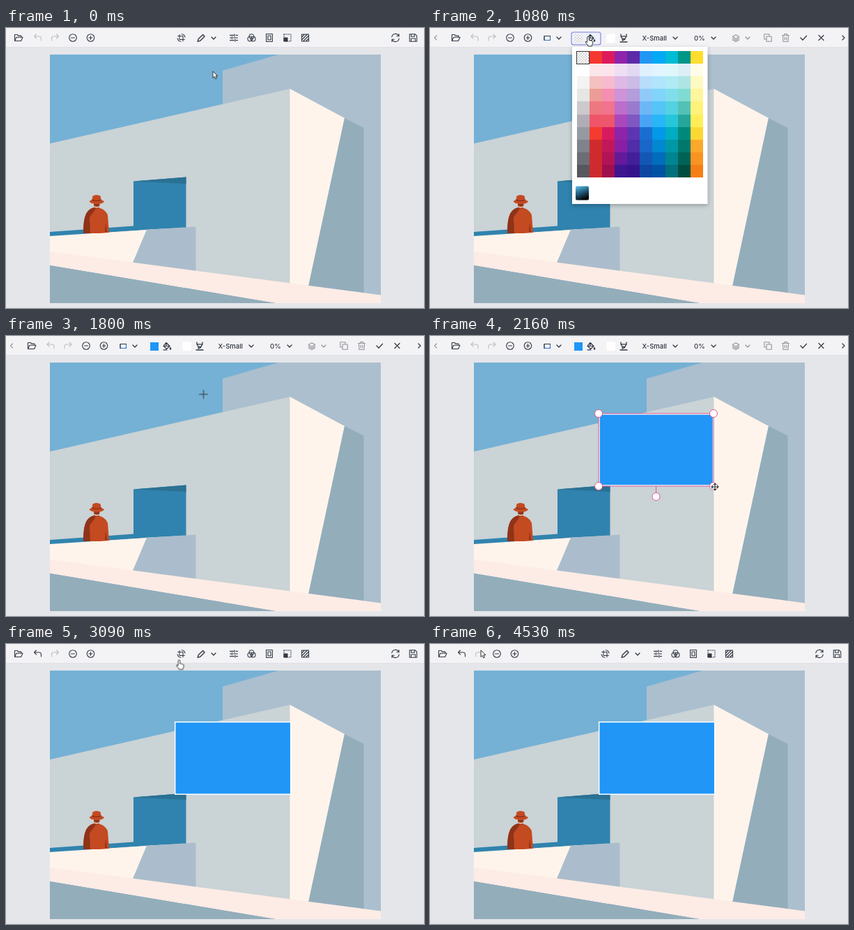
Recreate the animation shown at these times as an HTML page. Size 600 by 401 pixels, loop 4560 ms.

```html
<!DOCTYPE html>
<html lang="en">
<head>
<meta charset="utf-8">
<title>Image editor: draw, undo, redo</title>
<style>
html, body { margin: 0; width: 100%; height: 100%; overflow: hidden; background: #e5e6ea }
svg { display: block }
text { font: 500 9.5px Inter, sans-serif; fill: #2c323c; stroke: none }
.icons { fill: none; stroke: #333944; stroke-width: 1.1; stroke-linejoin: round; stroke-linecap: round }
.off { opacity: .28 }
.dim { opacity: .5 }
.panel { fill: #fff; filter: drop-shadow(0 2px 3px #0004) }
.grip { fill: #fff; stroke: #e2578f; stroke-width: 1 }

.step { animation: 4.56s step-end infinite }
#main { animation-name: main }
#draw { animation-name: draw }
#menu { animation-name: menu }
#hover { animation-name: hover }
#palette, #active { animation-name: palette }
#clear { animation-name: clear }
#blue { animation-name: blue }
#mark { animation-name: mark }
#undoMain { animation-name: undoMain }
#redoMain { animation-name: redoMain }
#undoDraw { animation-name: undoDraw }
.tools { animation-name: tools }
#placed { animation-name: placed }
#selection { animation-name: selection }
#arrow { animation-name: arrow }
#hand { animation-name: hand }
#cross { animation-name: cross }
#move { animation-name: move }
#drag { animation: dragShow 4.56s step-end infinite, dragSize 4.56s linear infinite }
#cursor { animation: travel 4.56s ease-in-out infinite }

@keyframes main { 0%, 60.4% { opacity: 1 } 15.1% { opacity: 0 } }
@keyframes draw { 0%, 60.4% { opacity: 0 } 15.1% { opacity: 1 } }
@keyframes menu { 0%, 15.1% { opacity: 0 } 7.2% { opacity: 1 } }
@keyframes hover { 0% { opacity: 0; transform: translateY(0) } 9.4% { opacity: 1; transform: translateY(0) } 10% { opacity: 1; transform: translateY(20.2px) } 11.1% { opacity: 1; transform: translateY(40.4px) } }
@keyframes palette { 0%, 36.4% { opacity: 0 } 22.6% { opacity: 1 } }
@keyframes clear { 0% { opacity: 1 } 32.8% { opacity: 0 } }
@keyframes blue { 0% { opacity: 0 } 32.8% { opacity: 1 } }
@keyframes mark { 0% { transform: none } 32.8% { transform: translateX(90.7px) } }
@keyframes undoMain { 0%, 75.6% { opacity: .28 } 60.4%, 86.7% { opacity: 1 } }
@keyframes redoMain { 0%, 86.7% { opacity: .28 } 75.6% { opacity: 1 } }
@keyframes undoDraw { 0% { opacity: .28 } 48.6% { opacity: 1 } }
@keyframes tools { 0% { opacity: .5 } 48.6% { opacity: 1 } }
@keyframes placed { 0%, 75.6% { opacity: 0 } 60.4%, 86.7% { opacity: 1 } }
@keyframes selection { 0%, 60.4% { opacity: 0 } 46.6% { opacity: 1 } }
@keyframes dragShow { 0%, 46.6% { opacity: 0 } 41.6% { opacity: 1 } }
@keyframes dragSize { 0%, 41.4% { width: 0; height: 0 } 46%, 100% { width: 164px; height: 102px } }
@keyframes arrow { 0%, 49.6%, 75.6%, 86.7% { opacity: 1 } 4.6%, 57%, 80.5% { opacity: 0 } }
@keyframes hand { 0%, 15.1%, 36.4%, 75.6%, 86.7% { opacity: 0 } 4.6%, 20.2%, 57%, 80.5% { opacity: 1 } }
@keyframes cross { 0%, 20.2%, 46.6% { opacity: 0 } 15.1%, 36.4% { opacity: 1 } }
@keyframes move { 0%, 49.6% { opacity: 0 } 46.6% { opacity: 1 } }
@keyframes travel {
  0%, .6% { transform: translate(297px, 62px) }
  5.9%, 7.7% { transform: translate(298px, 13px) }
  11.8%, 15.1% { transform: translate(299px, 71px) }
  21.7%, 24.3% { transform: translate(227px, 13px) }
  31.6%, 36% { transform: translate(311px, 42px) }
  39.2%, 39.6% { transform: translate(283.5px, 83.5px) }
  41%, 41.4% { transform: translate(243px, 112px); animation-timing-function: linear }
  46%, 48.2% { transform: translate(409px, 216px) }
  57.9%, 61.2% { transform: translate(536px, 13px) }
  67.6%, 68% { transform: translate(248.5px, 23.5px) }
  73%, 77.6% { transform: translate(44px, 13px) }
  82.2%, 97% { transform: translate(70px, 12px) }
  99.2%, 100% { transform: translate(73px, 9px) }
}
</style>
</head>
<body>
<svg width="600" height="401" viewBox="0 0 600 401">
<defs>
  <path id="open" d="M-5.5 4.5V-4.5h3.7l1.5 1.6h4.2v2M-5.5 4.5-3-.8h9L3.6 4.5z"/>
  <path id="undo" d="M-2-5-5-2l3 3M-5-2h7q3 0 3 3v3"/>
  <path id="redo" d="M2-5 5-2l-3 3M5-2h-7q-3 0-3 3v3"/>
  <g id="less"><circle r="5.3"/><path d="M-2.5 0h5"/></g>
  <g id="more"><circle r="5.3"/><path d="M-2.5 0h5M0-2.5v5"/></g>
  <path id="crop" d="M-2.5-4.5v7h7.3M-4.8-2.5h7.3v7.3M.5-5.2q4.3.2 4.8 4.4M-.5 5.2q-4.3-.2-4.8-4.4"/>
  <path id="pencil" d="m-4.8 4.8.9-3.6L2.6-5 5-2.6l-6.4 6.5z" stroke-width="1.4"/>
  <path id="down" d="M-3-1.5 0 1.5l3-3" stroke-width="1.4"/>
  <path id="sliders" d="M-5.5-3.6h5M3-3.6h2.5M.9-5.2v3.2M-5.5 0h1.6M-1 0h6.5M-2.6-1.6v3.2M-5.5 3.6h6M3.5 3.6h2M2-5.2M2 2v3.2"/>
  <g id="rings"><circle cy="-1.8" r="3.4"/><circle cx="-2.2" cy="1.6" r="3.4"/><circle cx="2.2" cy="1.6" r="3.4"/></g>
  <path id="frame" d="M-4.4-5.5h8.8v11h-8.8zM-2-3h4v6h-4z"/>
  <g id="resize"><path d="M-5-5H5V5H-5z" stroke-dasharray="1.5 1.5" stroke-width=".9"/><path d="M-5 0h5v5h-5z" fill="#333944"/></g>
  <path id="redact" d="M-5-5H5V5H-5zM-5-1l4-4M-5 3l8-8M-3 5l8-8M1 5l4-4"/>
  <path id="reset" d="M-5.2-1A5.2 5.2 0 0 1 4.8-2.3M5-5.5v3.3H1.8M5.2 1A5.2 5.2 0 0 1-4.8 2.3M-5 5.5V2.2h3.2"/>
  <path id="save" d="M-5.2-5.2h8l2.4 2.4v8H-5.2zM-2.8-5v3.2h4.6V-5M-3 5V1h6v4"/>
  <path id="bucket" d="m-1-5 5 5-4.4 4L-5-.2zM-4 0h7M-1-5v4M5 2q1.4 2 0 2.6Q3.6 4 5 2M-5 5.3h5" stroke-width="1.2"/>
  <path id="marker" d="M-4-5.5v2.8L-1.8 1v2.5L1.8 1.8V1L4-2.7v-2.8M-4-2.7h8M-1.8 1h3.6M-5 5.5H5" stroke-width="1.3"/>
  <path id="layers" d="M0-4.8 4.8-2 0 .8-4.8-2zM-4.8.3 0 3 4.8.3M-4.8 2.5 0 5.1l4.8-2.6"/>
  <path id="copy" d="M-2-2h7.2v7.2H-2zM-2 2h-3.2v-7.2H2V-2"/>
  <path id="trash" d="M-5-3.5H5M-4-3.5l.5 9h7l.5-9M-2-3.5v-2h4v2M-1.3-1v4M1.3-1v4"/>
  <path id="box" d="M-5-3.6H5V3.6H-5z"/>
  <path id="pen" d="M-5 5h10M-4.5 3.8-3-.8 1-2.2 3.4 0 1.8 3.2zM1-2.2l2-2L5.5-1.7 3.4 0M-4.5 3.8-1 1"/>
  <path id="line" d="M-4.5 4.5l9-9"/>
  <circle id="ellipse" r="5"/>
  <path id="pointer" d="M-4.5 4.5l9-9M-2-4.5h6.5V2"/>
  <path id="pulse" d="M-5.5 1h2.3L-1.3-4.5 1.3 4.5 3 .5h2.5"/>
  <path id="letter" d="M-4.5-3v-1.8h9V-3M0-4.8v9.6M-1.8 4.8h3.6"/>
  <g id="picture"><rect x="-5" y="-5" width="10" height="10" rx="1"/><circle cx="-1.8" cy="-1.8" r="1"/><path d="m-4 4.5 5.5-5L5 3"/></g>
  <pattern id="checks" width="4" height="4" patternUnits="userSpaceOnUse"><path fill="#fff" d="M0 0h4v4H0z"/><path fill="#d5d5d5" d="M0 0h2v2H0zM2 2h2v2H2z"/></pattern>
  <linearGradient id="shade" x2=".4" y2="1"><stop stop-color="#62c2ee"/><stop offset=".45" stop-color="#2c6e91"/><stop offset="1" stop-color="#05090d"/></linearGradient>
  <clipPath id="edge"><path d="M576 0h7.5v28H576z"/></clipPath>
</defs>

<path fill="#e5e6ea" d="M0 0h600v401H0z"/>

<g id="painting">
  <path fill="#75b1d5" d="M63 38h475v356H63z"/>
  <path fill="#abbfce" d="M311 61l80-23h147v356H311z"/>
  <path fill="#cad3d6" d="M63 165.500 408 87v279L63 325z"/>
  <path fill="#fff4eb" d="M407.500 87 486 129l-52 242-26.500-4z"/>
  <path fill="#93adbb" d="M486 129l27.500 14v236L434 370z"/>
  <path fill="#3083ae" d="M183 219.500l75.500-6V286L183 289.500z"/>
  <path fill="#2b7193" d="M183 219.500l75.500-6V223z"/>
  <path fill="#3083ae" d="M63 292l120-8.500 19 5.500-139 10z"/>
  <path fill="#fff4eb" d="M63 298l139-9-20 48-119-16z"/>
  <path fill="#abbdcc" d="M202 289l70.500-4.500V349L182 336z"/>
  <path fill="#fdece5" d="M63 320l475 62.500V394H387L63 340z"/>
  <path fill="#93adbb" d="M63 340l324 54H63z"/>
  <path fill="#c44a21" d="M111 294c0-12 1-25 6-31 3-4 8-6 13-6 7 0 14 5 16 11l2 25-14 1z"/>
  <path fill="#8f3319" d="M111 294c0-12 1-25 6-31 3-4 7-6 11-6 2 4-6 9-8 15l1 22zM142 292l1-13 2 13z"/>
  <path fill="#93371d" d="M126 251h8.500l-.5 6q-4 3-7.500 0z"/>
  <path fill="#f3d6c5" d="M126.500 255q4 2 7.500 0v1.500q-4 2-7.500 0z"/>
  <path fill="#c44a21" d="M119.500 248q3-1.500 4-2.500l1-5q5-3 11 0l1 5q2 2 4.500 2.500-1 4-10.500 4t-11-4z"/>
  <path fill="#8f3319" d="M123.500 245.500q7 2.500 13 0l.5 1.500q-7 2.500-14 0z"/>
</g>

<rect id="placed" class="step" x="242.700" y="111.700" width="166" height="103.500" fill="#2196f6" stroke="#fff" stroke-width="1.500"/>
<rect id="drag" x="243" y="112" width="0" height="0" fill="#2196f6" stroke="#fff" stroke-width="1.500"/>
<g id="selection" class="step">
  <rect x="243" y="112" width="163.500" height="102" fill="#2196f6" stroke="#fff" stroke-width="1.500"/>
  <path d="M242 111h165v104H242zM324.500 215v10" fill="none" stroke="#e2578f"/>
  <circle class="grip" cx="242" cy="111" r="5.500"/><circle class="grip" cx="407" cy="111" r="5.500"/>
  <circle class="grip" cx="242" cy="215" r="5.500"/><circle class="grip" cx="407" cy="215" r="5.500"/>
  <circle class="grip" cx="324.500" cy="230" r="5.500"/>
</g>

<path fill="#f3f3f6" d="M0 0h600v27H0z"/>
<path fill="#dfe0e6" d="M0 27h600v.7H0z"/>

<g id="main" class="icons step">
  <use href="#open" x="18" y="14"/>
  <g id="undoMain" class="step"><use href="#undo" x="45.500" y="14"/></g>
  <g id="redoMain" class="step"><use href="#redo" x="70.500" y="14"/></g>
  <use href="#less" x="96" y="14"/><use href="#more" x="121.500" y="14"/>
  <use href="#crop" x="251.500" y="14"/><use href="#pencil" x="280" y="14.500"/><use href="#down" x="298" y="14.500"/>
  <use href="#sliders" x="327" y="14"/><use href="#rings" x="352.500" y="14"/><use href="#frame" x="378" y="14"/>
  <use href="#resize" x="404" y="14"/><use href="#redact" x="429.500" y="14"/>
  <use href="#reset" x="559" y="14"/><use href="#save" x="584.500" y="14"/>
</g>

<g id="draw" class="icons step">
  <path d="M9.500 11l-3 3 3 3" class="dim"/>
  <use href="#open" x="37" y="14"/>
  <g id="undoDraw" class="step"><use href="#undo" x="64" y="14"/></g>
  <use href="#redo" x="89" y="14" class="off"/>
  <use href="#less" x="115" y="14"/><use href="#more" x="140.500" y="14"/>
  <path d="M164 11.500h8.500v6H164z" stroke="#2b72c4"/><path d="M164 17.500v-6h8.500" stroke="#333944"/>
  <use href="#down" x="185" y="14.500"/>
  <rect id="active" class="step" x="203" y="6" width="42" height="18" rx="3" fill="#eef0fb" stroke="#7a80dc"/>
  <g stroke="none">
    <path id="clear" class="step" fill="url(#checks)" d="M206.500 9H219v12h-12.500z"/>
    <path id="blue" class="step" fill="#2196f6" d="M207 9h12v12h-12z"/>
    <path fill="#fff" d="M253.500 8.500h12.500v12.500h-12.500z"/>
  </g>
  <use href="#bucket" x="231" y="14.500"/><use href="#marker" x="278" y="14.500"/>
  <text x="304.500" y="18">X-Small</text><use href="#down" x="352" y="14.500"/>
  <text x="379" y="18">0%</text><use href="#down" x="407" y="14.500"/>
  <g class="tools step">
    <use href="#layers" x="439" y="14.500"/><use href="#down" x="456" y="14.500"/>
    <use href="#copy" x="485" y="14"/><use href="#trash" x="510.500" y="14"/>
  </g>
  <path d="M532 14l3 3.200 5.500-6M558 10.500l7 7M565 10.500l-7 7M592 11l3 3-3 3" stroke-width="1.300"/>
  <use href="#reset" x="587" y="14" clip-path="url(#edge)"/>
</g>

<g id="menu" class="step">
  <rect class="panel" x="267" y="27" width="85" height="167" rx="2"/>
  <path id="hover" class="step" fill="#f2f2f5" d="M267 29.200h85v20.200h-85z"/>
  <g class="icons">
    <use href="#pen" x="281.500" y="39.500"/><text x="295" y="42.800">Pen</text>
    <use href="#line" x="281.500" y="59.500"/><text x="295" y="63">Line</text>
    <use href="#box" x="281.500" y="79.500"/><text x="295" y="83.200">Rectangle</text>
    <use href="#ellipse" x="281.500" y="100"/><text x="295" y="103.400">Ellipse</text>
    <use href="#pointer" x="281.500" y="120"/><text x="295" y="123.600">Arrow</text>
    <use href="#pulse" x="281.500" y="140.500"/><text x="295" y="143.800">Path</text>
    <use href="#letter" x="281.500" y="160.500"/><text x="295" y="164">Add Text</text>
    <use href="#picture" x="281.500" y="181"/><text x="295" y="184.200">Add Image</text>
  </g>
</g>

<g id="palette" class="step">
  <path class="panel" d="M204 27h194.500v225H204z"/>
  <g id="swatches" shape-rendering="crispEdges"></g>
  <rect id="mark" class="step" x="210.500" y="33.500" width="18" height="18" fill="none" stroke="#3a3a3a"/>
  <rect x="209" y="226.500" width="19" height="20" rx="2" fill="url(#shade)"/>
</g>

<g id="cursor">
  <path id="arrow" class="step" d="M0 0v9.500l2.200-2 1.500 3.400 1.700-.7L4 6.800h3z" fill="#fff" stroke="#222" stroke-width=".9"/>
  <path id="hand" class="step" d="M-1.300 7V.6Q-1.200-.6 0-.6T1.300.6v4.200q1.300-.7 2 .4 1.300-.4 1.900.6 1.600-.1 1.600 1.300 0 3-1.400 4.500V13h-5.600v-1.200L-3.500 8q-.7-1.400.5-1.700 1 .1 1.700 1.600" fill="#fff" stroke="#222" stroke-width=".9" stroke-linejoin="round"/>
  <path id="cross" class="step" d="M-6.500 0h13M0-6.500v13" stroke="#333" stroke-width="1"/>
  <g id="move" class="step" fill="none">
    <path d="M-5 0H5M0-5V5M-3-2-5 0l2 2M3-2l2 2-2 2M-2-3l2-2 2 2M-2 3l2 2 2-2" stroke="#fff" stroke-width="3"/>
    <path d="M-5 0H5M0-5V5M-3-2-5 0l2 2M3-2l2 2-2 2M-2-3l2-2 2 2M-2 3l2 2 2-2" stroke="#333" stroke-width="1.100"/>
  </g>
</g>
</svg>
<script>
// Each column: the pure colour, then tints and shades at the rows in `stops`.
const stops = [1, 3, 5, 6, 7, 9];
const columns = [
  'checks ffffff e6e6e3 b1adb6 959aa2 7f838b 57585e',
  'f4382f fbe6ea ec9c96 ef5468 f33b30 cf2b2f cf2a2f',
  'dd1a5c fce4ec f48fb1 ee566b d81b60 c2185b a00f50',
  '8e24aa eedff4 ce93d8 ab47bc 8e24aa 8a1fa5 3d1590',
  '5e2aa8 e2daf2 b39ddb 7e57c2 5e35b1 512da8 35138c',
  '2196f3 e0f0fc 90caf9 4aa4f5 1a6ed2 1967c8 0d47a1',
  '03a9f4 e1f5fe 81d4fa 29b6f6 0398e8 0288d1 0252a4',
  '00bcd4 def7fa 80deea 26c6da 00acc1 0097a7 00707c',
  '009688 dceef6 80dcd2 26a69a 00897b 00796b 004d40',
  'ffdd2e fffde7 fff59d ffee58 fdd835 fba92a f57f17'
];
const swatches = document.getElementById('swatches');

function mix(a, b, k) {
  const part = (hex, i) => parseInt(hex.slice(i, i + 2), 16);
  return 'rgb(' + [0, 2, 4].map(i => Math.round(part(a, i) + (part(b, i) - part(a, i)) * k)) + ')';
}

function shade(tones, row) {
  if (!row) return tones[0] === 'checks' ? 'url(#checks)' : '#' + tones[0];
  const i = Math.max(1, stops.findIndex(s => s >= row));
  return mix(tones[i], tones[i + 1], (row - stops[i - 1]) / (stops[i] - stops[i - 1]));
}

columns.forEach((column, c) => {
  const tones = column.split(' ');
  for (let row = 0; row < 10; row++) {
    const cell = document.createElementNS('http://www.w3.org/2000/svg', 'rect');
    const at = { x: 210.5 + c * 18.15, y: 33 + row * 18.1, width: 18.2, height: 18.2, fill: shade(tones, row) };
    for (const key in at) cell.setAttribute(key, at[key]);
    swatches.append(cell);
  }
});
</script>
</body>
</html>
```
